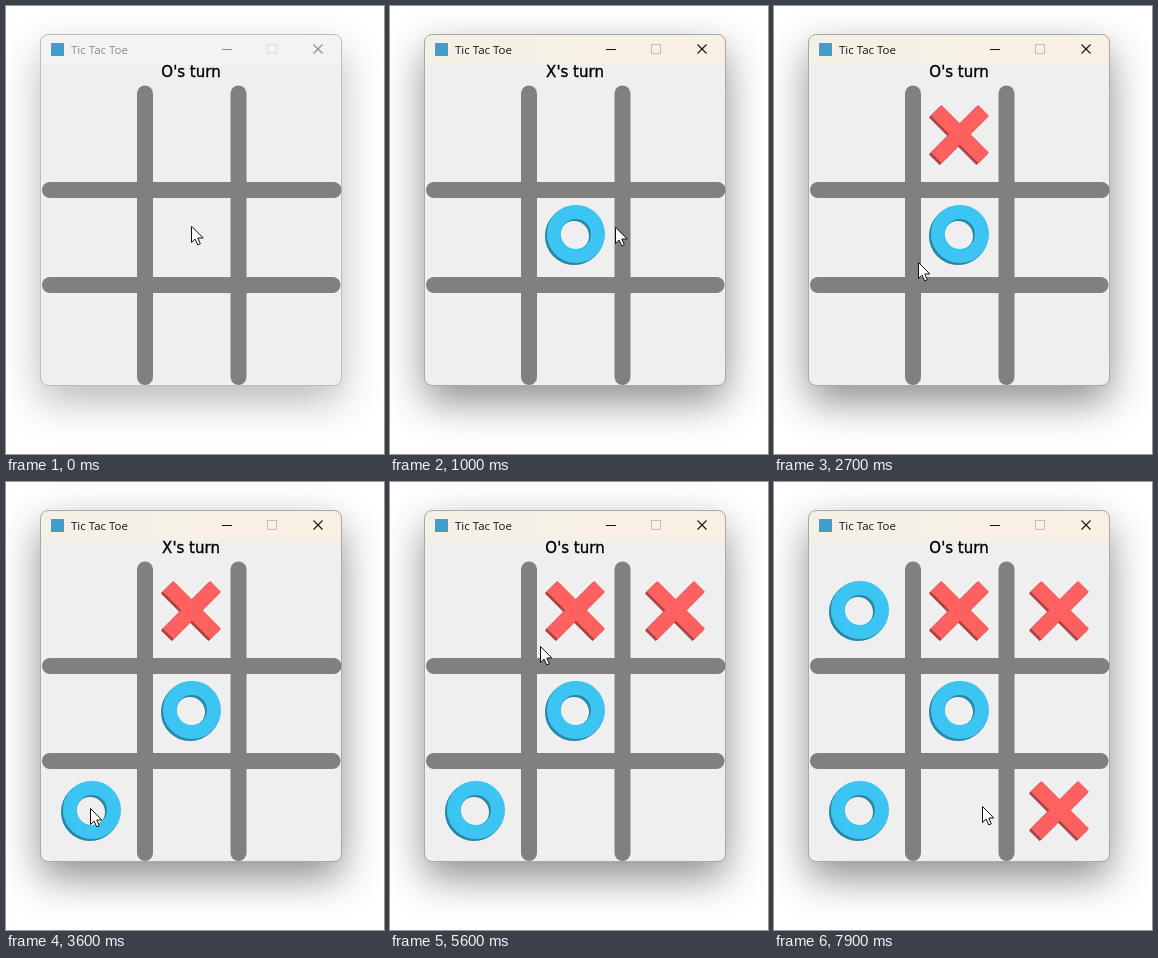
An HTML page with a canvas that plays this animation: 378 by 448 pixels, repeating every 8 s.

```html
<!DOCTYPE html>
<html lang="en">
<head>
<meta charset="utf-8">
<title>Tic Tac Toe</title>
<style>
html, body { margin: 0; width: 100%; height: 100%; overflow: hidden; background: #fff; }
canvas { display: block; width: 378px; height: 448px; }
</style>
</head>
<body>
<canvas id="stage" width="378" height="448"></canvas>
<script>
const ctx = document.getElementById('stage').getContext('2d');
const LOOP = 8000, STEP = 100;
const FOCUS_AT = 500;

const moves = [
  { at: 500, mark: 'O', col: 1, row: 1 },
  { at: 1700, mark: 'X', col: 1, row: 0 },
  { at: 3400, mark: 'O', col: 0, row: 2 },
  { at: 5000, mark: 'X', col: 2, row: 0 },
  { at: 6000, mark: 'O', col: 0, row: 0 },
  { at: 7200, mark: 'X', col: 2, row: 2 }
];

// Pointer waypoints: time, x, y
const path = [
  [0, 185, 220], [600, 185, 220], [1000, 225, 221], [1500, 188, 128],
  [2100, 186, 130], [2700, 144, 256], [3200, 84, 326], [3700, 84, 326],
  [4500, 224, 148], [4800, 280, 128], [5200, 280, 128], [5600, 150, 164],
  [5800, 86, 130], [5900, 86, 130], [6300, 88, 132], [6400, 88, 132],
  [6800, 242, 220], [7100, 285, 326], [7400, 285, 326], [7900, 208, 324], [8000, 206, 324]
];

const slope = (i, k) => (path[i + 1][k] - path[i][k]) / (path[i + 1][0] - path[i][0]);

// Monotone tangents keep the pointer still at its rests
function tangent(i, k) {
  if (i === 0 || i === path.length - 1) return 0;
  const a = slope(i - 1, k), b = slope(i, k);
  return a * b <= 0 ? 0 : 2 * a * b / (a + b);
}

function pointerAt(t) {
  let i = 0;
  while (i < path.length - 2 && path[i + 1][0] <= t) i++;
  const span = path[i + 1][0] - path[i][0];
  const u = (t - path[i][0]) / span, u2 = u * u, u3 = u2 * u;
  return [1, 2].map(k => Math.round(
    path[i][k] * (2 * u3 - 3 * u2 + 1) + path[i + 1][k] * (3 * u2 - 2 * u3) +
    span * (tangent(i, k) * (u3 - 2 * u2 + u) + tangent(i + 1, k) * (u3 - u2))));
}

const mix = (a, b, f) => `rgb(${a.map((v, i) => Math.round(v + (b[i] - v) * f))})`;

function line(x1, y1, x2, y2, color, width, cap = 'butt') {
  ctx.strokeStyle = color;
  ctx.lineWidth = width;
  ctx.lineCap = cap;
  ctx.beginPath();
  ctx.moveTo(x1, y1);
  ctx.lineTo(x2, y2);
  ctx.stroke();
}

function framePath(inset = 0) {
  ctx.beginPath();
  ctx.roundRect(34.5 + inset, 28.5 + inset, 301 - 2 * inset, 351 - 2 * inset, 7.5);
}

function drawWindow(focus) {
  ctx.save();
  ctx.shadowColor = `rgba(0,0,0,${0.28 + 0.17 * focus})`;
  ctx.shadowBlur = 40;
  ctx.shadowOffsetY = 16;
  ctx.fillStyle = '#efefef';
  framePath();
  ctx.fill();
  ctx.restore();

  ctx.save();
  framePath();
  ctx.clip();
  const bar = ctx.createLinearGradient(35, 0, 335, 0);
  bar.addColorStop(0, mix([243, 243, 243], [244, 240, 231], focus));
  bar.addColorStop(1, mix([243, 243, 243], [248, 240, 227], focus));
  ctx.fillStyle = bar;
  ctx.fillRect(34, 28, 302, 31);
  ctx.restore();

  ctx.strokeStyle = mix([190, 190, 190], [168, 168, 168], focus);
  ctx.lineWidth = 1;
  framePath();
  ctx.stroke();

  ctx.fillStyle = '#3f9fc8';
  ctx.fillRect(45, 37, 13, 13);

  const ink = mix([140, 140, 140], [20, 20, 20], focus);
  ctx.fillStyle = ink;
  ctx.font = '11.5px "Open Sans", sans-serif';
  ctx.textAlign = 'left';
  ctx.fillText('Tic Tac Toe', 65, 48);
  line(216, 43.5, 226, 43.5, ink, 1);
  line(307.5, 38.5, 316.5, 47.5, ink, 1.1);
  line(316.5, 38.5, 307.5, 47.5, ink, 1.1);
  ctx.strokeStyle = mix([222, 222, 222], [196, 192, 184], focus);
  ctx.lineWidth = 1;
  ctx.strokeRect(261.5, 38.5, 9, 9);
}

function drawGrid() {
  const gray = '#808080';
  line(139, 87.5, 139, 371, gray, 16, 'round');
  line(232.5, 87.5, 232.5, 371, gray, 16, 'round');
  line(44, 184, 327.5, 184, gray, 16, 'round');
  line(44, 279, 326.5, 279, gray, 16, 'round');
}

function ring(x, y, color) {
  ctx.strokeStyle = color;
  ctx.lineWidth = 14;
  ctx.beginPath();
  ctx.arc(x, y, 22, 0, Math.PI * 2);
  ctx.stroke();
}

function cross(x, y, color) {
  const r = 23.7;
  line(x - r, y - r, x + r, y + r, color, 15);
  line(x - r, y + r, x + r, y - r, color, 15);
}

function drawMark({ mark, col, row }) {
  const x = 85 + col * 100, y = 129 + row * 100;
  const shape = mark === 'O' ? ring : cross;
  const [face, side] = mark === 'O' ? ['#3cc5f3', '#2a86a6'] : ['#ff6060', '#a84444'];
  for (let d = 1; d >= -0.5; d -= 0.5) shape(x - d, y + d, side);
  shape(x + 0.9, y - 0.9, face);
}

function drawTurn(player) {
  ctx.fillStyle = ctx.strokeStyle = '#000';
  ctx.font = '15px "DejaVu Sans", sans-serif';
  ctx.textAlign = 'center';
  ctx.lineWidth = 0.35;
  ctx.fillText(`${player}'s turn`, 185, 71);
  ctx.strokeText(`${player}'s turn`, 185, 71);
}

function drawPointer([x, y]) {
  ctx.save();
  ctx.translate(x + 0.5, y + 0.5);
  ctx.beginPath();
  [[0, 0], [0, 16], [3.6, 12.6], [6.2, 18.4], [8.8, 17.3], [6.3, 11.5], [11.3, 11.5]]
    .forEach(p => ctx.lineTo(...p));
  ctx.closePath();
  ctx.fillStyle = '#fff';
  ctx.strokeStyle = '#111';
  ctx.lineWidth = 1;
  ctx.fill();
  ctx.stroke();
  ctx.restore();
}

function render(t) {
  const focus = Math.min(1, Math.max(0, (t - FOCUS_AT + STEP) / 200));
  const played = moves.filter(m => m.at <= t);
  ctx.fillStyle = '#fff';
  ctx.fillRect(0, 0, 378, 448);
  drawWindow(focus);
  drawTurn(played.length % 2 ? 'X' : 'O');
  drawGrid();
  played.forEach(drawMark);
  drawPointer(pointerAt(t));
}

const start = performance.now();
function tick() {
  const t = (performance.now() - start) % LOOP;
  render(Math.floor(t / STEP) * STEP);
  requestAnimationFrame(tick);
}
tick();
</script>
</body>
</html>
```
